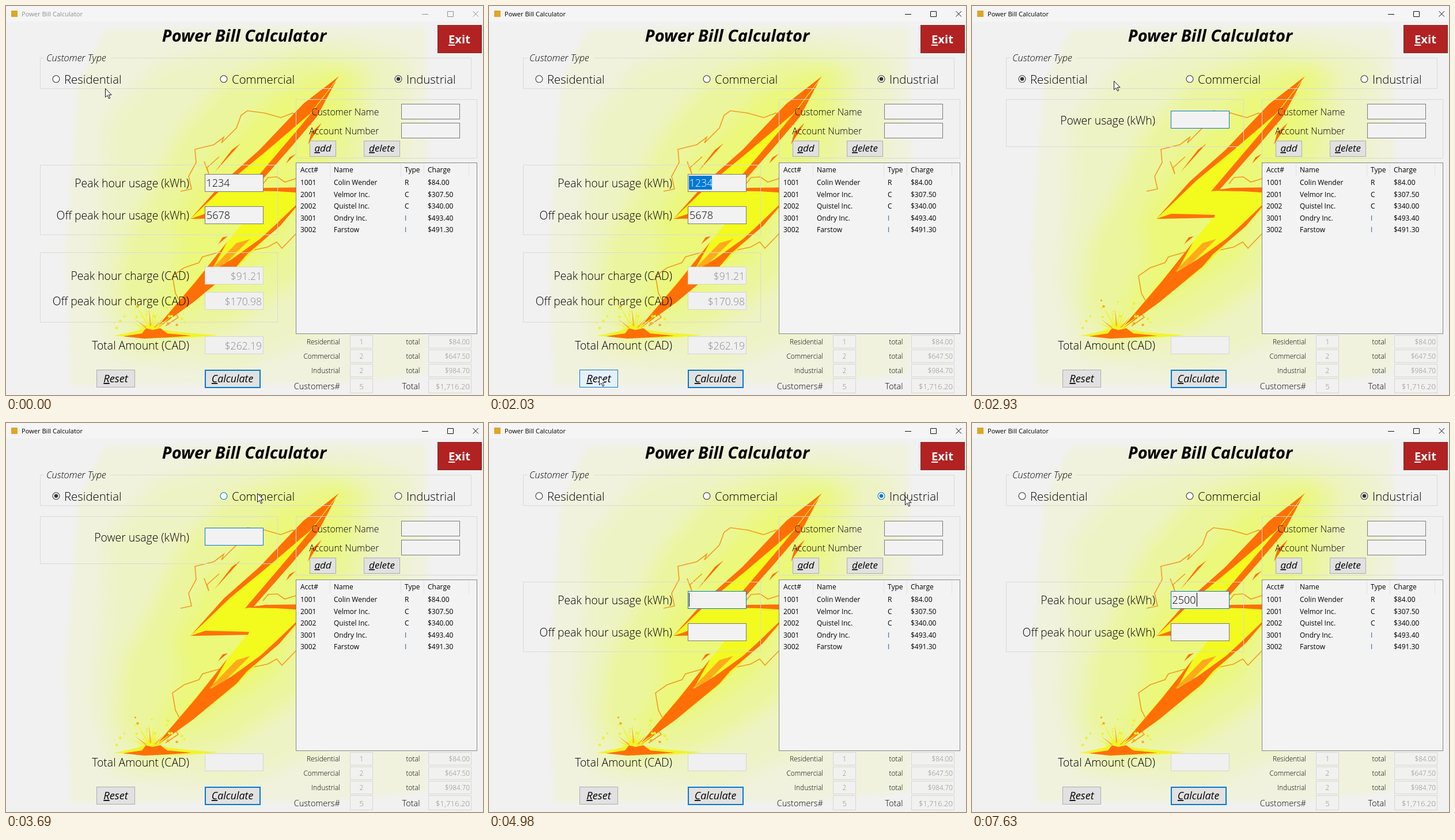
An HTML page for the animation above (8000 ms loop, 828 by 676 pixels).

```html
<!DOCTYPE html>
<html lang="en">
<head>
<meta charset="utf-8">
<title>Power Bill Calculator</title>
<style>
  html, body { margin: 0; width: 100%; height: 100%; overflow: hidden; background: #f1f1f1; }
  svg { display: block; position: absolute; left: 0; top: 0; }
  text { font-family: "Open Sans", "Noto Sans", sans-serif; white-space: pre; }
  .u { text-decoration: underline; }
</style>
</head>
<body>
<svg id="stage" width="828" height="676" viewBox="0 0 828 676">
  <defs>
    <filter id="soft" x="-20%" y="-20%" width="140%" height="140%"><feGaussianBlur stdDeviation="15"/></filter>
    <filter id="edge"><feGaussianBlur stdDeviation="5"/></filter>
  </defs>
  <rect width="828" height="676" fill="#f1f1f1"/>

  <!-- glow -->
  <path filter="url(#edge)" fill="#f0f2de" d="M125 135L170 42 400 36 728 36 734 280 730 640 560 658 112 660 103 430Z"/>
  <g filter="url(#soft)">
    <path fill="#eef3c6" d="M172 200L260 100 400 62 600 58 705 90 690 300 570 560 400 635 185 610 152 480 168 330Z"/>
    <path fill="#ebf59e" d="M300 215L380 125 520 80 640 110 610 300 510 480 390 560 240 598 190 520 202 410 245 330Z"/>
    <path fill="#ebf87a" d="M355 265L470 150 600 95 590 200 530 330 465 440 340 520 255 545 300 440 290 370Z"/>
  </g>

  <!-- crackle -->
  <g fill="none" stroke="#f59a1e" stroke-width="1.6">
    <path d="M303 322L322 318 317 296 330 272 328 249 361 241 378 228 374 238 400 212 408 190 419 182 449 186 477 194 498 186 514 201 530 206"/>
    <path d="M344 270L352 292 349 281 370 262M446 309L455 298 471 297 484 306 503 300"/>
    <path d="M503 396L479 421 470 410 454 419 421 426 399 422 369 428 341 436 335 446 309 455 289 469 294 499 301 512M289 528L299 541 277 556"/>
  </g>

  <!-- bolt -->
  <path fill="#f2fa1e" d="M578 122L516 172 440 252 380 304 320 370 420 366 345 458 256 565 322 517 400 455 470 385 525 332 540 318 417 321 497 226 540 174Z"/>
  <g fill="#ff6f08">
    <path d="M578 122L516 170 440 250 378 305 320 370 390 303 452 252 528 187Z"/>
    <path d="M320 370L346 361 422 363 420 368Z"/>
    <path d="M573 130L535 180 500 222 415 322 429 320 495 245 540 192Z"/>
    <path d="M417 321L450 316 520 315 520 325 470 322Z"/>
    <path d="M520 330L470 378 405 438 420 430 475 383Z"/>
    <path d="M384 410L330 478 256 565 325 515 400 453 442 404 392 440 355 462Z"/>
    <path d="M548 203L524 241 530 220ZM407 239L362 289 392 250ZM385 400L368 414 376 402ZM503 257L486 274 492 263Z"/>
  </g>
  <path fill="#ffa91c" d="M400 412L352 462 380 448 424 405Z"/>

  <!-- impact -->
  <g id="burst"></g>
  <path fill="#f2f42a" d="M186 573Q230 566 250 556Q275 567 370 572Q290 581 186 573Z"/>
  <path fill="#ff6f08" d="M203 574L236 569 243 560 254 563 268 560 280 569 322 573 280 576 240 578Z"/>
  <g id="ui"></g>
</svg>
<script>
const LOOP = 8000, BLUE = '#0078d7', GREY = '#7a7a7a', CELL = '#f2f2f2';
let layer = document.getElementById('burst');

function el(tag, attrs, parent = layer) {
  const node = document.createElementNS('http://www.w3.org/2000/svg', tag);
  for (const k in attrs) node.setAttribute(k, attrs[k]);
  return parent.appendChild(node);
}
// Outline box given by its outer pixel edges
const box = (x, y, r, b, fill, stroke) =>
  el('rect', { x: x + .5, y: y + .5, width: r - x - 1, height: b - y - 1, fill, stroke });

// "&" marks the first letter as an access key
function text(x, y, str, size, opt = {}) {
  const node = el('text', { x, y, 'font-size': size, 'font-weight': 300, fill: '#000', ...opt });
  if (str[0] === '&') {
    el('tspan', { class: 'u' }, node).textContent = str[1];
    el('tspan', {}, node).textContent = str.slice(2);
  } else node.textContent = str;
  return node;
}
const END = { 'text-anchor': 'end' }, MID = { 'text-anchor': 'middle' };
const PLAIN = { 'font-weight': 400 }, DIM = { fill: '#8c8c8c' };
const group = (x, y, r, b) => box(x, y, r, b, 'none', '#d9dbd4');
const label = (y, str) => text(318, y, str, 19.4, END);

function inLayer(draw) {
  const outer = layer;
  const g = layer = el('g', {}, outer);
  draw();
  layer = outer;
  return g;
}
const show = (node, on) => { node.style.display = on ? '' : 'none'; };

// Sparks around the strike point
let seed = 11;
const rnd = () => (seed = seed * 16807 % 2147483647) / 2147483647;
for (let i = 0; i < 13; i++) {
  const a = Math.PI * (1.08 + i * .065), len = 26 + rnd() * 30, c = Math.cos(a), s = Math.sin(a);
  el('path', {
    d: `M${252 - s * 2} ${566 + c * 2}L${252 + c * len} ${566 + s * len}L${252 + s * 2} ${566 - c * 2}Z`,
    fill: i % 4 === 2 ? '#ffb01e' : '#eef52c'
  });
}
for (let i = 0; i < 26; i++) {
  const a = Math.PI * (1.05 + rnd() * .85), d = 32 + rnd() * 40;
  el('circle', { cx: 250 + Math.cos(a) * d, cy: 568 + Math.sin(a) * d * .9, r: .8 + rnd() * 1.7,
    fill: i % 6 ? '#ecf230' : '#ffa81e' });
}

layer = document.getElementById('ui');

// Title bar
el('rect', { width: 828, height: 27, fill: '#f5f5f5' });
el('rect', { x: 9, y: 8, width: 11, height: 11, fill: '#e0a526' });
const caption = text(27, 18, 'Power Bill Calculator', 11.1, PLAIN);
const controls = el('path', { d: 'M722 14.5H733M766.5 9.5H776.5V18.5H766.5ZM810.5 9L820 18.5M820 9L810.5 18.5', fill: 'none' });

text(413.5, 62, 'Power Bill Calculator', 29, { ...MID, 'font-weight': 700, 'font-style': 'italic' });
box(749, 33, 826, 82, '#b22222', '#7d2a2a');
text(787, 65, '&Exit', 20.2, { ...MID, 'font-weight': 700, fill: '#fff' });

// Customer type
el('path', { d: 'M66 90.5H59.5V143.5H807.5V90.5H182', fill: 'none', stroke: '#d9dbd4' });
text(70, 96, 'Customer Type', 16.6, { 'font-style': 'italic' });
const radios = [[87, 'Residential'], [378, 'Commercial'], [681, 'Industrial']].map(([x, name]) => {
  text(x + 14, 135, name, 20.4);
  return {
    ring: el('circle', { cx: x, cy: 126.8, r: 6, fill: '#fafafa', 'stroke-width': 1.1 }),
    dot: el('circle', { cx: x, cy: 126.8, r: 3.3 })
  };
});

// Customer entry
group(503, 162, 818, 265);
text(647.5, 190, 'Customer Name', 15.9, END);
text(647.5, 223, 'Account Number', 15.9, END);
box(686, 170, 788, 197, CELL, GREY);
box(686, 203, 788, 230, CELL, GREY);
function button(x, y, r, b, name, size) {
  const frame = box(x, y, r, b, '#e1e1e1', '#adadad');
  text((x + r) / 2, b - 9, name, size, { ...MID, ...PLAIN, 'font-style': 'italic' });
  return frame;
}
button(527, 234, 573, 262, '&add', 17);
button(621, 234, 684, 262, '&delete', 17);

// Customer list
box(503, 272, 818, 570, '#f3f3f3', '#828790');
el('path', { d: 'M562.5 274V297M685.5 274V297M725.5 274V297M803.5 274V297', stroke: '#e2e2e2' });
const COLS = [511, 569, 692, 732];
[
  ['Acct#', 'Name', 'Type', 'Charge'],
  ['1001', 'Colin Wender', 'R', '$84.00'],
  ['2001', 'Velmor Inc.', 'C', '$307.50'],
  ['2002', 'Quistel Inc.', 'C', '$340.00'],
  ['3001', 'Ondry Inc.', 'I', '$493.40'],
  ['3002', 'Farstow', 'I', '$491.30']
].forEach((row, i) => row.forEach((s, c) =>
  text(COLS[c], i ? 291 + i * 20.4 : 289, s, 12, { ...PLAIN, fill: s === 'I' ? '#1f5f9c' : '#000' })));

// Totals
[
  ['Residential', '1', 'total', '$84.00'],
  ['Commercial', '2', 'total', '$647.50'],
  ['Industrial', '2', 'total', '$984.70'],
  ['Customers#', '5', 'Total', '$1,716.20']
].forEach(([name, count, word, sum], i) => {
  const last = i === 3, top = 572 + i * 25.3 | 0, bottom = top + (last ? 26 : 23);
  const y = last ? 666 : 588 + i * 25, size = last ? 14.5 : 11.9;
  text(580, y, name, size, END);
  text(718.5, y, word, size, END);
  box(597, top, 637, bottom, '#f1f1ef', '#d6d6d6');
  box(733, top, 808, bottom, '#f1f1ef', '#d6d6d6');
  text(617, y, count, last ? 13.4 : 11.9, { ...MID, ...DIM });
  text(805, y, sum, last ? 13.3 : 11.8, { ...END, ...DIM });
});

// Total amount and main buttons
function result(y, value) {
  box(345, y, 447, y + 31, '#f0f0f0', '#d4d6d2');
  return text(444, y + 22.5, value, 17.6, { ...END, ...DIM });
}
label(597, 'Total Amount (CAD)');
const total = result(574, '$262.19');
const reset = button(157, 632, 224, 663, '&Reset', 18.4);
button(345, 632, 441, 663, '&Calculate', 17.8);
el('rect', { x: 346, y: 633, width: 95, height: 30, fill: 'none', stroke: BLUE, 'stroke-width': 2 });

// Panels that depend on the customer type
let powerBox, peakBox, peakText, offText, mark;
const powerPanel = inLayer(() => {
  group(59, 162, 472, 245);
  label(206, 'Power usage (kWh)');
  powerBox = box(345, 182, 447, 213, CELL, GREY);
});
const peakPanel = inLayer(() => {
  group(59, 276, 472, 398);
  label(315, 'Peak hour usage (kWh)');
  label(371, 'Off peak hour usage (kWh)');
  peakBox = box(345, 292, 447, 323, CELL, GREY);
  box(345, 348, 447, 379, CELL, GREY);
  mark = el('rect', { x: 347, y: 295, width: 40, height: 24, fill: BLUE });
  peakText = text(347.5, 314, '', 18);
  offText = text(348, 370, '5678', 18);
});
const chargePanel = inLayer(() => {
  group(59, 428, 472, 550);
  label(476, 'Peak hour charge (CAD)');
  label(520, 'Off peak hour charge (CAD)');
  result(453, '$91.21');
  result(497, '$170.98');
});

const caret = el('rect', { width: 1, height: 24, fill: '#000' });
const arrow = el('path', { d: 'M.5 .5V15.5L4 12.3 6.6 17.8 8.8 16.8 6.3 11.4H11Z', fill: '#fff', stroke: '#111' });
const beam = el('path', { d: 'M351 297.5H353.5L354.5 298.5 355.5 297.5H358M354.5 298V312M351 312.5H353.5L354.5 311.5 355.5 312.5H358', fill: 'none', stroke: '#222' });

// Tracks: [time, value]; a value holds until the next time
const POINTER = [
  [0, 172, 143], [120, 171, 139],
  [1120, 176, 178], [1240, 207, 310], [1360, 224, 475], [1480, 206, 613], [1630, 191, 643],
  [2270, 194, 585], [2420, 186, 465], [2540, 166, 300], [2660, 152, 172], [2780, 152, 128],
  [2930, 246, 130], [3080, 355, 127], [3200, 460, 117], [3570, 445, 121], [3690, 436, 122],
  [3960, 450, 121], [4080, 515, 116], [4200, 610, 112], [4320, 683, 126],
  [4440, 704, 128], [4560, 720, 130], [4710, 752, 120], [4830, 775, 112],
  [4980, 722, 127], [5100, 703, 130], [5240, 560, 180], [5370, 390, 262]
];
const HOVER = [[0, -1], [120, 0], [1120, -1], [2780, 0], [2930, -1], [3200, 1], [4080, -1], [4320, 2], [5240, -1]];
const TYPE = [[0, 2], [2150, 0], [3840, 1], [4980, 2]];
const FOCUS = [[0, 0], [2150, 1], [4830, 0], [4980, 1]];
const CARET = [
  [0, 0], [2150, 1], [2660, 0], [3200, 1], [3570, 0], [3840, 1], [4440, 0],
  [4710, 1], [4830, 0], [4980, 1], [5520, 0], [6340, 1], [6850, 0], [7110, 1]
];
const TYPED = [[0, '1234'], [2150, ''], [7110, '2'], [7230, '25'], [7510, '250'], [7630, '2500']];
const at = (track, t) => track.findLast(step => step[0] <= t);

function render(t) {
  const [, x, y] = at(POINTER, t);
  const hover = at(HOVER, t)[1], type = at(TYPE, t)[1], typed = at(TYPED, t)[1];
  const focus = at(FOCUS, t)[1], active = t >= 2030, cleared = t >= 2150;

  caption.setAttribute('fill', active ? '#000' : '#8f8f8f');
  controls.setAttribute('stroke', active ? '#111' : '#8f8f8f');

  radios.forEach(({ ring, dot }, i) => {
    const color = i === hover ? BLUE : '#333';
    ring.setAttribute('stroke', color);
    dot.setAttribute('fill', color);
    show(dot, i === type);
  });

  const overReset = t >= 1630 && t < 2270;
  reset.setAttribute('fill', overReset ? '#e5f1fb' : '#e1e1e1');
  reset.setAttribute('stroke', overReset ? BLUE : '#adadad');

  show(powerPanel, type < 2);
  show(peakPanel, type === 2);
  show(chargePanel, !cleared);
  show(total, !cleared);
  show(offText, !cleared);
  for (const b of [powerBox, peakBox]) b.setAttribute('stroke', focus ? BLUE : GREY);
  powerBox.setAttribute('fill', type === 1 ? '#fff' : CELL);

  const selected = active && !cleared;
  show(mark, selected);
  peakText.textContent = typed;
  peakText.setAttribute('fill', selected ? '#fff' : '#000');

  show(caret, at(CARET, t)[1]);
  caret.setAttribute('x', 347 + (type === 2 ? typed.length * 10.75 | 0 : 0));
  caret.setAttribute('y', type === 2 ? 295 : 185);

  show(arrow, t < 5520);
  arrow.setAttribute('transform', `translate(${x} ${y})`);
  show(beam, t >= 5520 && t < 7110);
}

const start = performance.now();
function tick() {
  render((performance.now() - start) % LOOP);
  requestAnimationFrame(tick);
}
render(0);
requestAnimationFrame(tick);
</script>
</body>
</html>
```
